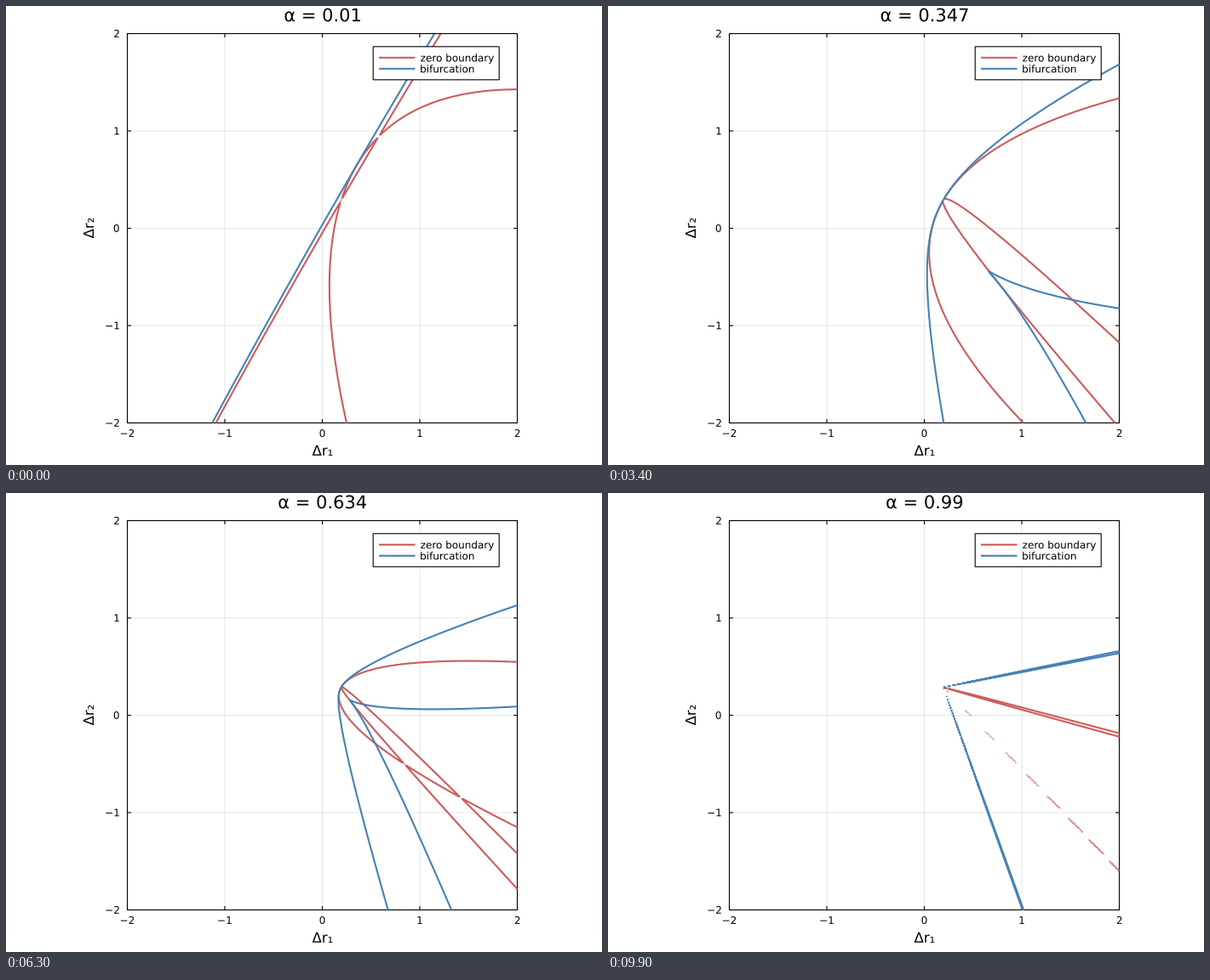
Write a matplotlib script that moves like this. It is 700 px wide and 540 px high and loops after 10000 ms.

```python
import numpy as np
import matplotlib.pyplot as plt
from matplotlib.animation import FuncAnimation
from matplotlib.patches import PathPatch, Rectangle
from matplotlib.textpath import TextPath
from matplotlib.transforms import Affine2D

W, H, DPI = 700, 540, 100
FRAMES, INTERVAL = 100, 100
RED, BLUE = "indianred", "steelblue"
PX = 72 / DPI
SMALL, MEDIUM, LARGE = 12, 16.5, 21

plt.rcParams["font.family"] = "DejaVu Sans"
plt.rcParams["path.simplify"] = False
plt.rcParams["path.snap"] = False

# Growth rates vanish at ORIGIN; a mixes linear (0) and quadratic (1) terms.
ORIGIN = (0.194, 0.2877)
# One-species parabolas: axis slope, linear coefficients
PARABOLAS = [(1.0457, 0.0702, 0.2205), (0.2715, 0.685, 1.178)]
# Fold directions (1, N1), (1, -N2) and the linear part in that basis
N1, N2 = 0.2, 2.793
H11, H12, H21, H22 = 0.80583, -0.73865, -0.28118, 0.22609
K1 = H11**2 / 4 + H12 * H22 / 2
K2 = H22**2 / 4 + H21 * H11 / 2

grid = np.linspace(-2, 2, 401)
X, Y = np.meshgrid(grid - ORIGIN[0], grid - ORIGIN[1])
E2 = (N1 * X - Y) / (N1 + N2)
E1 = X - E2


def zero_boundary(c2):
    """Product of the implicit parabolas where one species vanishes."""
    out = 1
    for m, g1, g2 in PARABOLAS:
        k = g2 + m * g1
        z = Y + m * X
        out = out * (z**2 + c2 * k * g1 * z - c2 * k**2 * X)
    return out


def bifurcation(c2):
    """Discriminant of the two-species equilibrium equations."""
    p, q = E1 + c2 * K1, E2 + c2 * K2
    a2, b2 = c2 * H12**2, c2 * H21**2
    return (256 * (p**2 * q**2 - a2 * q**3 - b2 * p**3)
            + 288 * a2 * b2 * p * q - 27 * (a2 * b2) ** 2)


fig = plt.figure(figsize=(W / DPI, H / DPI), dpi=DPI, facecolor="white")

L, R, T, B = 142.5, 600.5, 32.5, 490.5
ax = fig.add_axes([L / W, 1 - B / H, (R - L) / W, (B - T) / H])
ax.set(xlim=(-2, 2), ylim=(-2, 2), xticks=[], yticks=[])
ax.axis("off")

# Pixel-unit layers below and above the curves
under, over = (fig.add_axes([0, 0, 1, 1], zorder=z) for z in (-1, 5))
for layer in (under, over):
    layer.set(xlim=(0, W), ylim=(H, 0))
    layer.axis("off")


def line(layer, x0, y0, x1, y1, color="black", width=1.1, **kw):
    layer.plot([x0, x1], [y0, y1], color=color, lw=width * PX,
               solid_capstyle="butt", **kw)


def text_path(s, x, y, size, align=0.5, angle=0):
    """Outline of s on the baseline y; align 0, 0.5, 1 is left, centre, right."""
    path = TextPath((0, 0), s, size=size)
    box = path.get_extents()
    shift = -(box.x0 + align * box.width)
    move = Affine2D().translate(shift, 0).scale(1, -1).rotate_deg(angle)
    return move.translate(x, y).transform_path(path)


def label(*args, **kw):
    return over.add_patch(PathPatch(text_path(*args, **kw), fc="black", lw=0))


for v in range(-2, 3):
    x = L + (v + 2) * (R - L) / 4
    y = B - (v + 2) * (B - T) / 4
    if abs(v) < 2:
        line(under, x, T, x, B, width=1, alpha=0.1)
        line(under, L, y, R, y, width=1, alpha=0.1)
    for edge, d in [(B, -4.5), (T, 4.5)]:
        line(under, x, edge, x, edge + d)
    for edge, d in [(L, 4.5), (R, -4.5)]:
        line(under, edge, y, edge + d, y)
    s = str(v).replace("-", "\u2212")
    label(s, x, 506.9, SMALL)
    label(s, 132.7, y + 4.3, SMALL, align=1)
under.add_patch(Rectangle((L, T), R - L, B - T, fc="none", ec="black",
                          lw=1.1 * PX))

label("Δr₁", 371.5, 528.8, MEDIUM)
label("Δr₂", 103, 261.5, MEDIUM, angle=-90)
title = label("α", 371.7, 18.1, LARGE)

over.add_patch(Rectangle((431.2, 47.8), 148, 39, fc="white", ec="black",
                         lw=1.1 * PX))
for y, color, name in [(60.8, RED, "zero boundary"), (73.8, BLUE, "bifurcation")]:
    line(over, 438, y, 480.5, y, color, 2.1, zorder=3)
    label(name, 487.2, y + 4.5, SMALL, align=0).set_zorder(3)

curves = []


def update(i):
    while curves:
        curves.pop().remove()
    a = 0.01 + 0.98 * i / (FRAMES - 1)
    c2 = (1 - a) ** 2 / a
    for z, (func, color) in enumerate([(zero_boundary, RED), (bifurcation, BLUE)]):
        curve = ax.contour(grid, grid, func(c2), levels=[0], colors=color,
                           linewidths=2.1 * PX, linestyles="solid", zorder=3 + z)
        curve.set(joinstyle="round", snap=False)
        curves.append(curve)
    title.set_path(text_path(f"α = {round(a, 3)}", 371.7, 18.1, LARGE))
    return curves


anim = FuncAnimation(fig, update, frames=FRAMES, init_func=lambda: [],
                     interval=INTERVAL, repeat=True, repeat_delay=0, blit=False)
plt.show()
```
